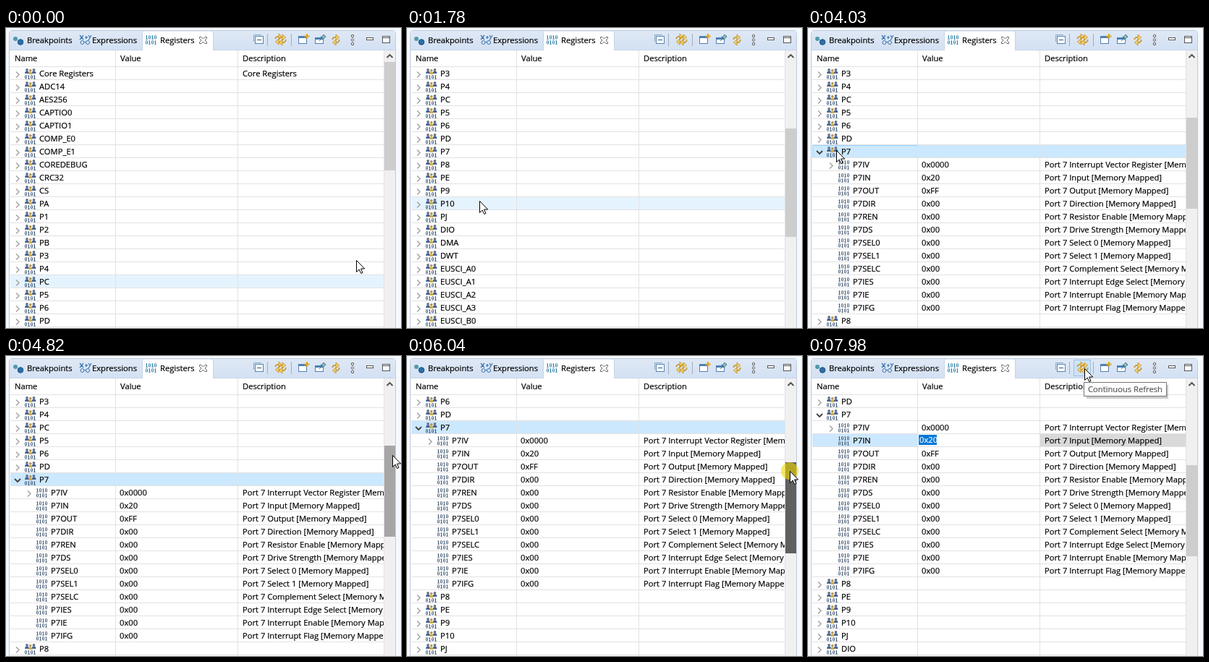
An HTML page that plays this animation: 546 px wide and 415 px high, repeating every 8 s.

```html
<!DOCTYPE html>
<html lang="en">
<head>
<meta charset="utf-8">
<title>Registers view</title>
<style>
  html, body { margin: 0; width: 100%; height: 100%; overflow: hidden; background: #f5f8fc; }
  svg { display: block; width: 546px; height: 415px; }
  text {
    font: 11.2px "Open Sans", "Noto Sans", sans-serif; white-space: pre;
    color: #000; fill: currentColor; stroke: currentColor; stroke-width: .2px;
  }
  .line { fill: none; stroke-width: 1; }
</style>
</head>
<body>
<svg id="stage" viewBox="0 0 546 415" xmlns="http://www.w3.org/2000/svg">
  <defs>
    <linearGradient id="bar" x2="0" y2="1">
      <stop offset="0" stop-color="#dfe8f5"/><stop offset="1" stop-color="#d3e1f3"/>
    </linearGradient>
    <clipPath id="table"><path d="M5 31H523V415H5Z"/></clipPath>
    <g id="zero"><rect x=".5" y=".5" width="2" height="4.5" rx=".8"/></g>
    <g id="one"><path d="M.3 1.5L1.5.5V5M.2 5.2H2.8"/></g>
    <g id="low" class="line" stroke-width=".9">
      <use href="#zero"/><use href="#one" x="4"/><use href="#zero" x="8"/><use href="#one" x="12"/>
    </g>
    <g id="bits">
      <g class="line">
        <use href="#one"/><use href="#zero" x="4"/><use href="#one" x="8"/><use href="#zero" x="12"/>
      </g>
      <use href="#low" y="7"/>
    </g>
    <g id="group">
      <path d="M0 8Q0 4.5 3 4.5T6 8ZM9.500 8Q9.500 4.500 12.500 4.500T15.500 8Z" fill="#45659a"/>
      <circle cx="3" cy="3" r="1.900" fill="#66748c"/><circle cx="12.500" cy="3" r="1.900" fill="#66748c"/>
      <path d="M5 9Q5 5.500 7.700 5.500T10.500 9Z" fill="#d3ab45"/>
      <circle cx="7.700" cy="3.800" r="1.800" fill="#b89550"/>
      <use href="#low" y="10" stroke="#3f5878"/>
    </g>
    <g id="sync" fill="none" stroke="#c8962a" stroke-width="1.600">
      <path d="M2 7Q3 3 8 4M12 7Q11 12 6 11"/>
      <path d="M7 0L11.500 4 7 8ZM7 7L2.500 11 7 15Z" fill="#f5d573" stroke-width="1"/>
    </g>
  </defs>

  <path d="M4.500 415V8Q4.500 3.500 9 3.500H534Q538.500 3.500 538.500 8V415" fill="#fff" stroke="#bfcbdc"/>
  <path d="M5 30V8Q5 4 9 4H534Q538 4 538 8V30Z" fill="url(#bar)"/>
  <path d="M5 30.500H538" stroke="#c6d3e6"/>
  <path d="M188.500 31V4H284Q286.500 4 286.500 7V31" fill="#fff" stroke="#c6d3e6"/>
  <path d="M189 30.500H286" stroke="#fff"/>

  <circle cx="13" cy="15" r="3" fill="#4f9aa6"/>
  <circle cx="20" cy="19.500" r="3.800" fill="#2f6ea8" stroke="#1f5384"/>
  <text x="29" y="21">Breakpoints</text>
  <g class="line" stroke="#3b74ad">
    <path d="M102 10L107 16M107 10L102 16M109 13H113M111 11V15M114 10L116 13M118 10L114 17" stroke-width="1.200"/>
    <circle cx="105.500" cy="20" r="2.500"/><circle cx="113" cy="20" r="2.500"/><path d="M108 19.500H110.500"/>
  </g>
  <text x="119" y="21">Expressions</text>
  <use href="#bits" x="193" y="10" stroke="#2f80ab"/>
  <text x="213" y="21">Registers</text>
  <path d="M267.500 12.500H270L272.500 15 275 12.500H277.500V14.500L275 17 277.500 19.500V21.500H275L272.500 19 270 21.500H267.500V19.500L270 17 267.500 14.500Z" fill="#fff" stroke="#666"/>

  <rect id="button" x="367.500" y="5.500" width="23" height="22" fill="#cfe2f7" stroke="#9cc3ea"/>
  <path d="M361.500 8V25M394.500 8V25" stroke="#a3adba"/>
  <g class="line" stroke="#5682b3">
    <path d="M342.500 19V9.500H353" stroke="#7fa9c4"/>
    <rect x="344.500" y="11.500" width="11" height="10" fill="#fff"/><path d="M347 16.500H353" stroke="#245a94"/>
  </g>
  <use href="#sync" x="370" y="8"/><use href="#sync" x="375" y="9"/>
  <g class="line" stroke="#4f7fb5">
    <rect x="404.500" y="11.500" width="11" height="10" fill="#fff"/><path d="M405 13H415" stroke-width="2"/>
    <path d="M416 8V15M412.500 11.500H419.500" stroke="#d9a520" stroke-width="2"/>
    <rect x="427.500" y="13.500" width="11" height="8" fill="#fff"/><path d="M428 15H438" stroke-width="2"/>
    <path d="M433 18L437 14M434.500 11.500L439.500 16.500M436 13L439 9 442 12 438.500 15Z" fill="#8ec0c8" stroke="#3b7483"/>
  </g>
  <use href="#sync" x="449" y="9"/>
  <g fill="#fff" stroke="#555">
    <circle cx="479" cy="11" r="1.700"/><circle cx="479" cy="16.500" r="1.700"/><circle cx="479" cy="22" r="1.700"/>
    <rect x="498.500" y="13.500" width="9" height="3"/>
    <rect x="520.500" y="11.500" width="10" height="9"/><path d="M520 13.500H531"/>
  </g>

  <g id="rows" clip-path="url(#table)"></g>
  <path id="grid" class="line" stroke="#e2e2e2"/>
  <text x="12" y="46">Name</text><text x="158" y="46">Value</text><text x="327" y="46">Description</text>

  <rect x="523" y="31" width="15" height="384" fill="#f0f0f0"/>
  <path d="M526.500 41L530.500 37 534.500 41" fill="none" stroke="#505050" stroke-width="1.800"/>
  <rect id="thumb" x="523" width="15"/>

  <g id="tip">
    <path d="M385 40H498V59H385Z" fill="#000" opacity=".2"/>
    <rect x="381.500" y="36.500" width="114" height="19" fill="#fff" stroke="#767676"/>
    <text x="387" y="50" style="color:#575757">Continuous Refresh</text>
  </g>

  <circle id="halo" r="12" fill="#f0d800" opacity=".6"/>
  <path id="arrow" d="M.5.5V16.500L4.200 13 6.700 18.500 9 17.500 6.600 12H11.700Z" fill="#fff" stroke="#000"/>
  <path id="beam" class="line" stroke="#000" d="M-3 -7.500H-.5M.5 -7.500H3M0 -7V7M-3 7.500H-.5M.5 7.500H3"/>
</svg>
<script>
const LOOP = 8000, LAG = 8, TOP = 54, ROW = 18, SHOWN = 20;
const $ = id => document.getElementById(id);
const set = (id, attrs) => { for (const k in attrs) $(id).setAttribute(k, attrs[k]); };
const show = (id, on) => set(id, { visibility: on ? 'visible' : 'hidden' });

const groups = ('Core Registers,ADC14,AES256,CAPTIO0,CAPTIO1,COMP_E0,COMP_E1,COREDEBUG,CRC32,CS,PA,P1,P2,PB,' +
  'P3,P4,PC,P5,P6,PD,P7,P8,PE,P9,P10,PJ,DIO,DMA,DWT,EUSCI_A0,EUSCI_A1,EUSCI_A2,EUSCI_A3,EUSCI_B0')
  .split(',').map(name => ({ name, desc: name === 'Core Registers' ? name : '' }));
const port = groups.findIndex(g => g.name === 'P7');
const fields = [
  ['IV', 'Interrupt Vector Register', '0x0000'], ['IN', 'Input', '0x20'], ['OUT', 'Output', '0xFF'],
  ['DIR', 'Direction'], ['REN', 'Resistor Enable'], ['DS', 'Drive Strength'], ['SEL0', 'Select 0'],
  ['SEL1', 'Select 1'], ['SELC', 'Complement Select'], ['IES', 'Interrupt Edge Select'],
  ['IE', 'Interrupt Enable'], ['IFG', 'Interrupt Flag']
].map(([id, desc, value = '0x00']) =>
  ({ name: 'P7' + id, desc: `Port 7 ${desc} [Memory Mapped]`, value, child: true }));
const expanded = [...groups.slice(0, port + 1), ...fields, ...groups.slice(port + 1)];

// Pointer moves: start, end, steps, target x y, bend x y, linear
const moves = [
  [110, 570, 5, 220, 19, 350, 170],
  [1000, 1000, 1, 228, 17],
  [1680, 1780, 2, 100, 239],
  [2010, 2230, 3, 81, 177],
  [2350, 2350, 1, 80, 174],
  [2680, 3010, 4, 150, 12, 120, 90],
  [3127, 3350, 3, 20, 174, 60, 90],
  [4030, 4030, 1, 39, 169],
  [4143, 4820, 7, 534, 137, 290, 170],
  [5030, 5240, 3, 529, 136, 533, 141],
  [5480, 6160, 7, 529, 163, 529, 149.5, true],
  [6610, 6950, 4, 300, 23, 460, 50],
  [7061, 7287, 3, 180, 115, 200, 35],
  [7520, 7980, 5, 382, 17, 270, 55]
];

function pointer(t) {
  let x = 484, y = 321;
  for (const [t0, t1, n, x1, y1, bx = (x + x1) / 2, by = (y + y1) / 2, linear] of moves) {
    if (t < t0 - LAG) break;
    const gap = (t1 - t0) / (n - 1) || 1;
    const u = Math.min(n, Math.floor((t - t0 + LAG) / gap) + 1) / n;
    const e = linear ? u : u * u * (3 - 2 * u), f = 1 - e;
    x = f * f * x + 2 * e * f * bx + e * e * x1;
    y = f * f * y + 2 * e * f * by + e * e * y1;
    if (u < 1) break;
  }
  return { x: Math.floor(x), y: Math.floor(y) };
}

function chevron(x, y, open) {
  return open
    ? `<path d="M${x - 1} ${y - 2}l4 4 4-4" fill="none" stroke="#404040" stroke-width="1.8"/>`
    : `<path d="M${x + 1} ${y - 3.500}l4 4-4 4" fill="none" stroke="#a0a0a0" stroke-width="1.4"/>`;
}

const label = (x, y, s, color = '#000') => `<text x="${x}" y="${y}" style="color:${color}">${s}</text>`;
const band = (x, y, width, fill) => `<rect x="${x}" y="${y}" width="${width}" height="17" fill="${fill}"/>`;

function drawRow(row, y, s, hot) {
  const mid = y + 9, open = s.open && row.name === 'P7';
  const editing = s.edit && row.name === 'P7IN';
  const chosen = open && !s.edit;
  const fill = editing || chosen ? '#cce8ff' : hot ? '#e5f3ff' : '';
  let out = fill && band(6, y, 516, fill);
  if (chosen && hot) out += `<path d="M6.5 ${y + 17}V${y + .5}H151" fill="none" stroke="#99d1ff"/>`;
  if (editing) {
    out += band(152, y, 168, '#fff') + band(321, y, 201, '#d9d9d9') +
      `<rect x="153" y="${y + 1}" width="25" height="14" fill="#0078d7"/>`;
  }
  if (row.child) {
    if (row.name === 'P7IV') out += chevron(29, mid + 1);
    out += `<use href="#bits" x="42" y="${y + 3}" stroke="#4a5f78"/>`;
  } else {
    out += chevron(13, mid + 1, open) + `<use href="#group" x="26" y="${y + 1}"/>`;
  }
  out += label(row.child ? 62 : 46, y + 13, row.name) + label(327, y + 13, row.desc);
  if (editing) out += label(154, y + 12, row.value, '#fff');
  else if (row.value) out += label(157, y + 13, row.value);
  return out;
}

let drawn = '';
function drawRows(s) {
  const key = JSON.stringify(s);
  if (key === drawn) return;
  drawn = key;
  const list = s.open ? expanded : groups;
  $('rows').innerHTML = list.slice(s.scroll, s.scroll + SHOWN)
    .map((row, i) => drawRow(row, TOP + ROW * i, s, i === s.hover)).join('');
}

const within = (t, a, b) => t >= a - LAG && t < b - LAG;

function render(t) {
  const { x, y } = pointer(t);
  const since = at => t >= at - LAG;
  const drag = within(t, 5480, 6160), open = since(3580), edit = since(7400);

  let scroll = since(1780) ? 14 : since(1680) ? 6 : 0;
  if (drag) scroll += Math.round((y - 136) / 5.45);
  if (since(6160)) scroll = 19;

  let hover = -1;
  if (!since(110)) hover = 16;
  else if (!drag && x > 5 && x < 522 && y >= TOP) hover = Math.floor((y - TOP) / ROW);
  drawRows({ scroll, open, edit, hover });

  const top = !open ? Math.round(47 + 92 * scroll / 14) : drag ? y - 12 : since(6160) ? 151 : 124;
  const height = open ? 126 : 150;
  const over = x >= 523 && x < 538 && y >= top && y < top + height;
  set('thumb', { y: top, height, fill: drag ? '#606060' : over ? '#a6a6a6' : '#cdcdcd' });

  show('button', x >= 367 && x < 391 && y >= 5 && y < 28);
  show('tip', since(7980));
  show('halo', drag || within(t, 3580, 3790) || within(t, 7287, 7400));
  const beam = within(t, 7400, 7520);
  show('beam', beam);
  show('arrow', !beam);
  for (const id of ['halo', 'arrow', 'beam']) set(id, { transform: `translate(${x} ${y})` });
}

let grid = 'M5 53.500H522M151.500 31V415M320.500 31V415M522.500 31V415';
for (let i = 0; i < SHOWN; i++) grid += `M6 ${TOP + ROW * i + 17.5}H522`;
set('grid', { d: grid });

function tick() {
  render(performance.now() % LOOP);
  requestAnimationFrame(tick);
}
tick();
</script>
</body>
</html>
```
